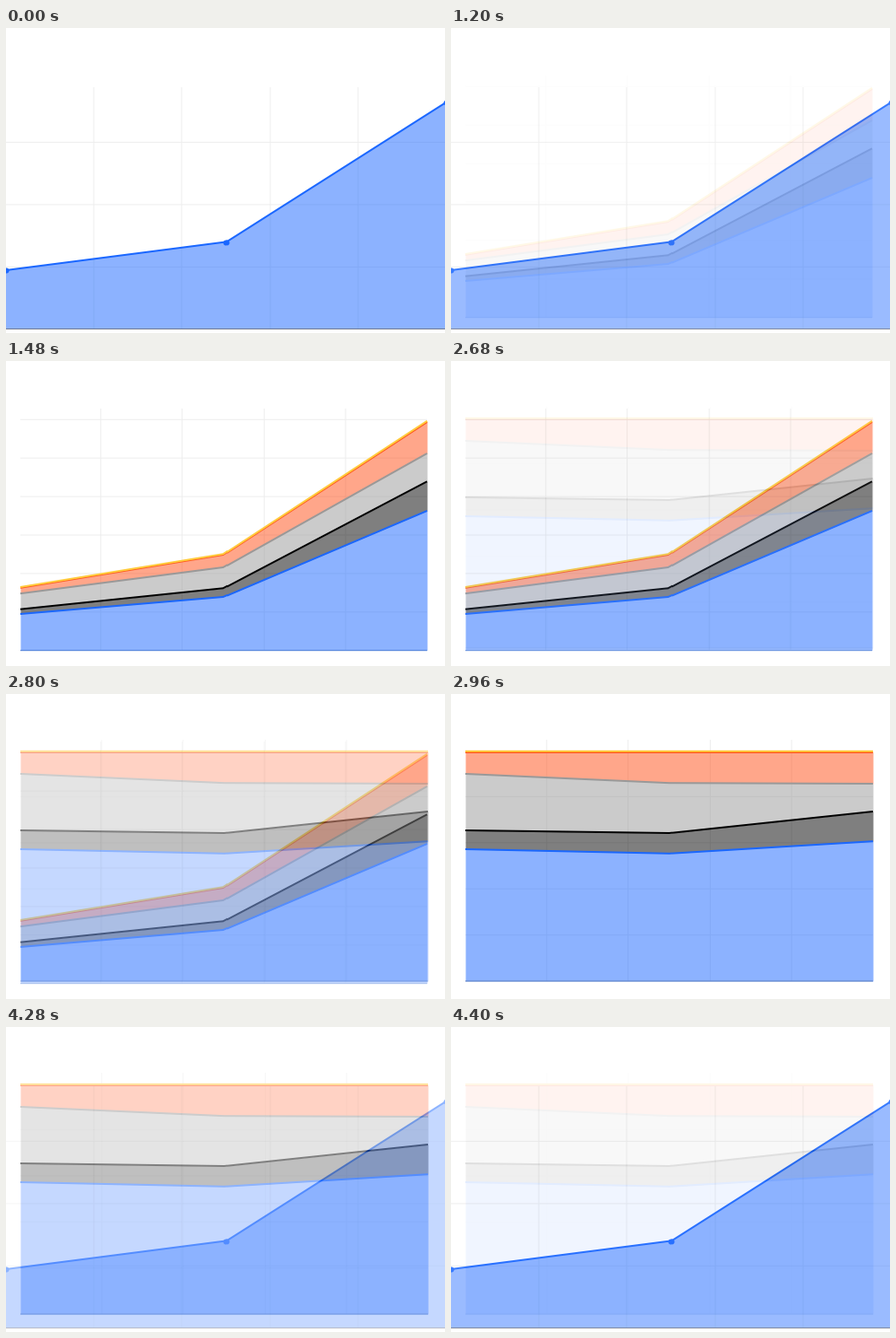
Write a matplotlib script that moves like this. It is 490 by 340 pixels and loops after 4.44 s.

```python
import matplotlib.pyplot as plt
import numpy as np
from matplotlib.animation import FuncAnimation

W, H, DPI = 490, 340, 100
STEP = 40                # ms per frame
HOLD, FADE = 30, 8       # frames a chart stays, steps of a crossfade
CYCLE = HOLD + FADE - 1
PX = 72 / DPI            # one pixel in points

BLUE, BLACK, GREY = "#1a67ff", "#000000", "#999999"
ORANGE, YELLOW = "#ff4e17", "#ffcb3c"
COLORS = [BLUE, BLACK, GREY, ORANGE, YELLOW]

fig = plt.figure(figsize=(W / DPI, H / DPI), dpi=DPI, facecolor="white")


def stage(width=W):
    """Axes measured in pixels, y pointing down."""
    ax = fig.add_axes([0, 0, width / W, 1])
    ax.set(xlim=(0, width), ylim=(H, 0))
    ax.axis("off")
    return ax


def line(ax, x, y, color, width=1.0, z=1):
    ax.plot(x, y, color=color, lw=width * PX, zorder=z, snap=False,
            solid_capstyle="butt", solid_joinstyle="miter")


def grid(ax, xs, ys, left, right, top, base):
    for x in xs:
        line(ax, [x, x], [top, base], "#eeeeee")
    for y in ys:
        line(ax, [left, right], [y, y], "#eeeeee")


def areas(ax, x, series, base):
    """Half-transparent bands stacked on the base, then their outlines."""
    low = np.full(len(x), base, float)
    for y, color in zip(series, COLORS):
        ax.fill_between(x, low, y, color=color, alpha=0.5, lw=0, zorder=2,
                        snap=False)
        low = np.array(y, float)
    for y, color in zip(series, COLORS):
        line(ax, x, y, color, 2, z=3)


def single_chart():
    ax = stage(W - 1)
    x, y, base = [0, 245, 490], [270, 238.5, 83], 335.5
    grid(ax, 98 * np.arange(1, 5), base + 0.4 - 69.5 * np.arange(1, 4),
         0, W, 66, base)
    areas(ax, x, [y], base)
    ax.plot(x, y, "o", color=BLUE, ms=6 * PX, mew=0, zorder=4)
    line(ax, [0, W], [base, base], "#707a91", z=5)


def stacked_chart():
    ax = stage()
    x, base = [16, 242.3, 469], 322.5
    grid(ax, 15 + 90.75 * np.arange(1, 5), base + 0.2 - 42.9 * np.arange(1, 7),
         16, 469, 53, base)
    areas(ax, x, [[282, 263, 167], [276.7, 253.3, 134.3], [259.2, 230, 103],
                  [252.8, 216, 68], [252, 215.2, 66.8]], base)
    line(ax, [16, 469], [base + 0.2] * 2, "#4b7dd7", z=5)


def percent_chart():
    ax = stage()
    x, base = [16, 243.5, 470], 320
    grid(ax, 16 + 90.8 * np.arange(1, 5), base - 51.4 * np.arange(1, 5),
         16, 470, 51, base)
    areas(ax, x, [[173, 177.8, 164.2], [152, 155, 131], [89, 99.2, 100],
                  [65, 65, 65], [63.8, 63.8, 63.8]], base)
    line(ax, [16, 470], [base, base], "#5a7dbe", z=5)


def render(draw):
    fig.clear()
    draw()
    fig.canvas.draw()
    return np.asarray(fig.canvas.buffer_rgba())[..., :3] / 255.0


charts = [render(d) for d in (single_chart, stacked_chart, percent_chart)]
fig.clear()
picture = stage().imshow(charts[0], extent=(0, W, H, 0), aspect="auto",
                         interpolation="nearest")


def update(n):
    i, p = divmod(n, CYCLE)
    mix = max(0, p - HOLD + 1) / FADE
    after = charts[(i + 1) % len(charts)]
    picture.set_data((1 - mix) * charts[i] + mix * after)
    return [picture]


anim = FuncAnimation(fig, update, frames=CYCLE * len(charts), interval=STEP,
                     repeat=True, repeat_delay=0, blit=False)
plt.show()
```
